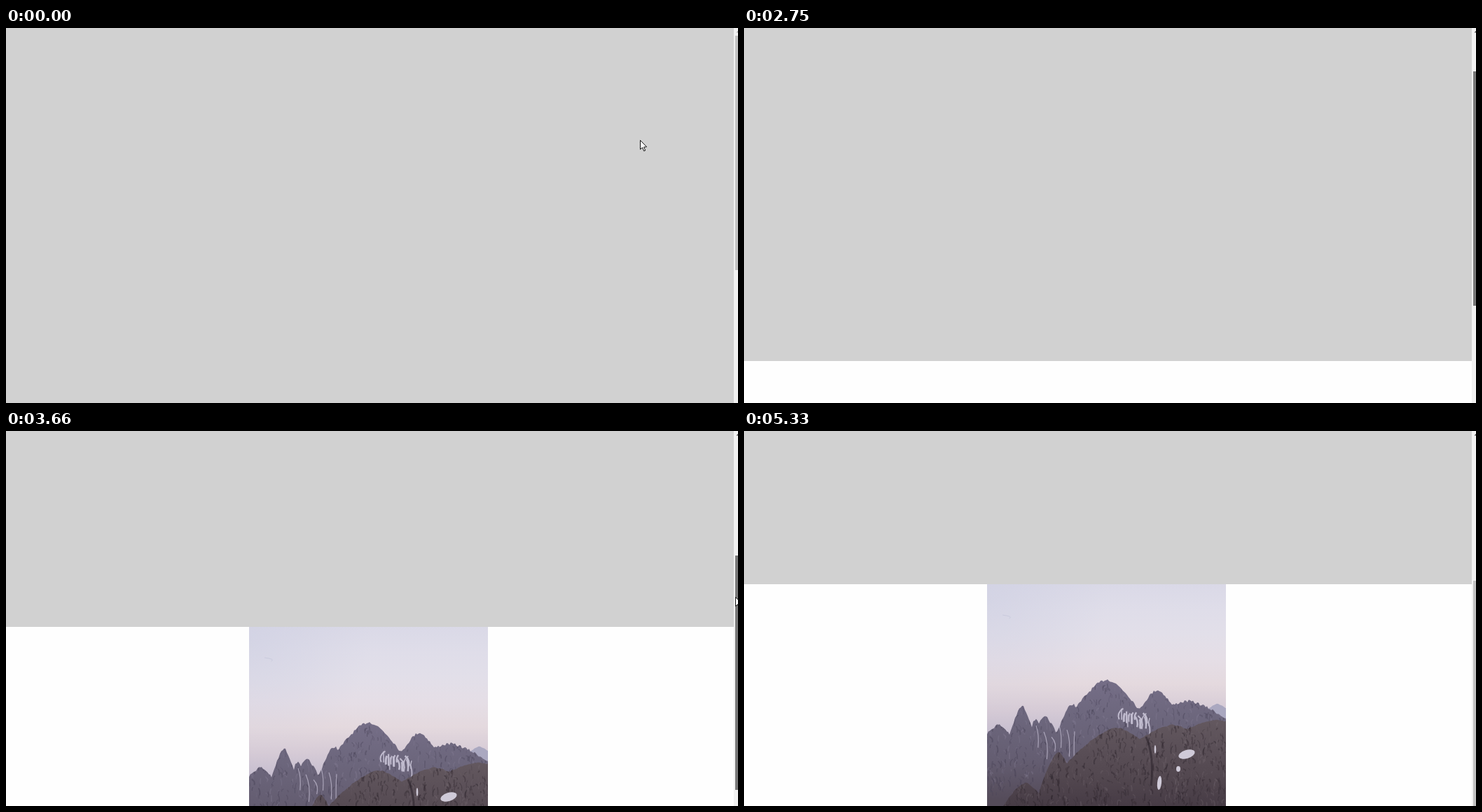
Write an HTML page with a canvas that moves like this. It is 1045x536 px and loops after 6.04 s.

```html
<!DOCTYPE html>
<html lang="en">
<head>
<meta charset="utf-8">
<title>Scrolling to a photo</title>
<style>
html, body { margin: 0; width: 100%; height: 100%; overflow: hidden; background: #fefefe; }
canvas { display: block; width: 100vw; height: 100vh; }
</style>
</head>
<body>
<canvas id="stage" width="1045" height="536"></canvas>
<script>
const LOOP = 6040, W = 1045, H = 536, PAGE_W = 1039;
const PHOTO = { x: 347, w: 341, h: 318 };
const THUMB = { x: 1041, top: 11, height: 335 };
const SCROLL_RATIO = 1.687; // page pixels per pixel of thumb travel
const ctx = document.getElementById('stage').getContext('2d');

const progress = (t, from, to) => Math.min(1, Math.max(0, (t - from) / (to - from)));
const ease = f => f * f * (3 - 2 * f);

let seed = 7;
const random = () => (seed = (seed * 16807) % 2147483647) / 2147483647;
const between = (low, high) => low + random() * (high - low);

function gradient(g, y0, y1, colors) {
  const fill = g.createLinearGradient(0, y0, 0, y1);
  colors.forEach((c, i) => fill.addColorStop(i / (colors.length - 1), c));
  return fill;
}

// The skyline is the highest of several peaks, each [x, top, width].
function mountains(peaks, jag) {
  const path = new Path2D();
  path.moveTo(0, PHOTO.h);
  for (let x = 0; x <= PHOTO.w + 2; x += 2) {
    const heights = peaks.map(([px, top, width]) => top + 30 * (Math.abs(x - px) / width) ** 1.5);
    path.lineTo(x, Math.min(...heights) + between(-jag, jag));
  }
  path.lineTo(PHOTO.w, PHOTO.h);
  return path;
}

function streak(g, color, x, y, dx, dy, width) {
  g.strokeStyle = color;
  g.lineWidth = width;
  g.beginPath();
  g.moveTo(x, y);
  g.quadraticCurveTo(x + dx, y + dy * 0.4, x + dx * 0.6, y + dy);
  g.stroke();
}

function paintRock(g, area, y0, y1, fill, colors) {
  g.fillStyle = fill;
  g.fill(area);
  g.save();
  g.clip(area);
  for (let i = 0; i < 900; i++) {
    streak(g, colors[i % colors.length], between(0, PHOTO.w), between(y0, y1),
      between(-5, 6), between(2, 11), between(0.5, 2.2));
  }
  g.restore();
}

function snowPatch(g, x, y, rx, ry, angle) {
  g.beginPath();
  g.ellipse(x, y, rx, ry, angle, 0, 7);
  g.fill();
}

function paintPhoto() {
  const canvas = document.createElement('canvas');
  canvas.width = PHOTO.w;
  canvas.height = PHOTO.h;
  const g = canvas.getContext('2d');

  g.fillStyle = gradient(g, 0, 215, ['#dad9e7', '#dfdde9', '#e2dfe9', '#e5dee6', '#e4d9de', '#d6cbd6', '#c5bdcf']);
  g.fillRect(0, 0, PHOTO.w, PHOTO.h);
  const haze = g.createRadialGradient(0, 20, 0, 0, 20, 170);
  haze.addColorStop(0, 'rgba(203,205,225,.5)');
  haze.addColorStop(1, 'rgba(203,205,225,0)');
  g.fillStyle = haze;
  g.fillRect(0, 0, 180, 190);
  streak(g, 'rgba(188,189,211,.5)', 22, 44, 16, 5, 1);

  g.fillStyle = '#aaa8c0';
  g.fill(mountains([[329, 171, 35]], 0.5));

  const ridge = mountains([[16, 201, 28], [50, 174, 14], [70, 192, 12], [83, 190, 19],
    [122, 171, 18], [137, 165, 16], [171, 136, 36], [243, 151, 26], [286, 167, 62]], 2);
  paintRock(g, ridge, 140, 300, gradient(g, 136, 310, ['#756e87', '#6c667c', '#645d71', '#544b59']),
    ['rgba(60,55,76,.35)', 'rgba(142,134,160,.25)', 'rgba(72,66,88,.35)']);

  // Snow gullies: a fan below the main peak and thin lines down the left flank.
  for (let i = 0; i < 18; i++) {
    const f = i / 17;
    streak(g, '#c0bbce', 192 + 40 * f, between(177, 189) + 8 * f,
      between(-10, 9), between(9, 20), between(1.2, 3.4));
  }
  for (let x = 70; x < 130; x += 11) {
    streak(g, 'rgba(186,180,200,.8)', x, between(200, 226), between(-4, 8), between(18, 42), 1.2);
  }

  const rock = mountains([[55, 284, 30], [102, 240, 18], [185, 205, 50], [265, 201, 60], [328, 194, 75]], 0.8);
  paintRock(g, rock, 196, 316, gradient(g, 194, 318, ['#63585f', '#5a4f57', '#52474f', '#463b45']),
    ['rgba(42,34,42,.4)', 'rgba(119,107,114,.28)', 'rgba(50,41,49,.4)']);
  streak(g, 'rgba(46,38,46,.6)', 227, 218, 12, 70, 3);

  g.fillStyle = '#cfcad8';
  snowPatch(g, 285, 243, 12, 6, -0.3);
  snowPatch(g, 246, 284, 3, 10, 0.1);
  snowPatch(g, 273, 264, 3, 4, 0);
  snowPatch(g, 240, 236, 1.3, 6, 0);
  return canvas;
}

const photo = paintPhoto();
const cursorShape = new Path2D('M.5.5v13l3-2.7 2.2 5 2-.8-2.1-4.9 4-.2z');

// The thumb is dragged in uneven pushes: [time, top].
const pushes = [[2100, 11], [2750, 62], [3110, 113], [3330, 127], [3660, 178], [3900, 214]];

function thumbTop(t) {
  let top = THUMB.top;
  for (let i = 1; i < pushes.length; i++) {
    const [from, a] = pushes[i - 1], [to, b] = pushes[i];
    top += (b - a) * progress(t, from, to);
  }
  return top;
}

function thumbColor(t) {
  if (t < 760 || t >= 4900) return '#c1c1c1';
  return t < 1510 ? '#a8a8a8' : '#787878';
}

function cursorPosition(t) {
  const approach = ease(progress(t, 210, 800));
  const drag = progress(t, 2100, 3900);
  const coast = progress(t, 4000, 4590);
  const leave = progress(t, 4600, 5330);
  return [
    905 + 137 * approach + 8 * Math.sin(drag * 1.2 * Math.PI) - 2 * coast - 3 * leave,
    160 - 100 * approach + 204 * drag + 38 * coast + 238 * leave ** 1.3
  ];
}

function rect(color, x, y, w, h) {
  ctx.fillStyle = color;
  ctx.fillRect(x, y, w, h);
}

function draw(t) {
  const thumb = thumbTop(t);
  const fold = Math.round(561.9 - (thumb - THUMB.top) * SCROLL_RATIO);

  rect('#fefefe', 0, 0, PAGE_W, H);
  rect('#d1d1d1', 0, 0, PAGE_W, fold);
  if (t >= 2900) ctx.drawImage(photo, PHOTO.x, fold);

  rect('#f1f1f1', PAGE_W, 0, W - PAGE_W, H);
  rect(thumbColor(t), THUMB.x, Math.round(thumb), W - THUMB.x, THUMB.height);
  ctx.fillStyle = t < 2100 ? '#a3a3a3' : '#404040';
  ctx.fill(new Path2D('M1042.5 6.5L1045 4V6.5Z'));

  const [x, y] = cursorPosition(t).map(Math.round);
  ctx.save();
  ctx.translate(x, y);
  ctx.fillStyle = '#fff';
  ctx.strokeStyle = '#111';
  ctx.fill(cursorShape);
  ctx.stroke(cursorShape);
  ctx.restore();
}

const start = performance.now();
function tick() {
  draw((performance.now() - start) % LOOP);
  requestAnimationFrame(tick);
}
tick();
</script>
</body>
</html>
```
